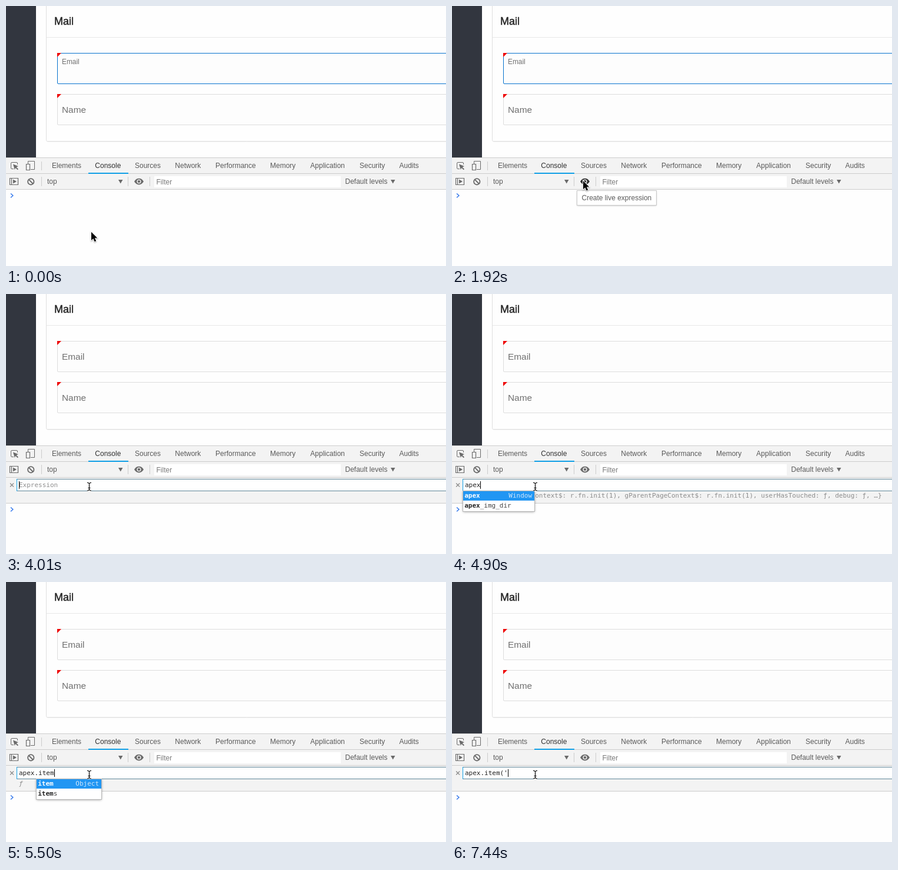
Animation, 748 px wide and 443 px high, one loop 8 s. Source, as an HTML page with a canvas:

```html
<!DOCTYPE html>
<html lang="en">
<head>
<meta charset="utf-8">
<title>Live expression demo</title>
<style>
  html, body { margin: 0; width: 100%; height: 100%; overflow: hidden; background: #fefefe; }
  canvas { display: block; }
</style>
</head>
<body>
<canvas id="stage" width="748" height="443"></canvas>
<script>
const ctx = document.getElementById('stage').getContext('2d');
const LOOP = 8000;
const SANS = '"Liberation Sans", Arial, sans-serif';
const MONO = '"DejaVu Sans Mono", Menlo, monospace';
const CHAR = 6.62;
const INK = '#5a5a5a', LINE = '#cccccc', BAR = '#f3f3f3', PAGE = '#fefefe';

// Step tracks: [time, ...values]
const POINTER = [
  [0, 145, 385], [140, 149, 381], [290, 166, 365], [440, 194, 339], [590, 222, 314],
  [740, 239, 302], [880, 243, 299], [1180, 233, 299], [1330, 231, 299], [1620, 227, 298],
  [1770, 223, 298], [3410, 201, 306], [3560, 158, 322], [3710, 141, 328]
];
const MAIL_CARET = [[0, 0], [290, 1], [740, 0], [1330, 1], [1770, 0], [2210, 1], [2810, 0]];
const CARET = [[0, 1], [3560, 0], [4010, 1], [6550, 0], [6990, 1]];
const TIP = [[0, 0], [1770, 0.4], [1920, 1], [2960, 0.4], [3110, 0]];
const FOCUS = [[0, 1], [2810, 0.9], [2960, 0.5], [3110, 0]];
const TYPED = [
  [0, ''], [4460, 'a'], [4610, 'ap'], [4750, 'ape'], [4900, 'apex'], [5050, 'apex.'],
  [5200, 'apex.i'], [5350, 'apex.ite'], [5500, 'apex.item'], [5950, 'apex.item('], [7440, "apex.item('"]
];
const GLOBALS = ['apex', 'apex_img_dir', 'addEventListener', 'alert', 'applicationCache', 'atob', 'alertinner'];
const MEMBERS = ['actions', 'ajax', 'confirm', 'da', 'debug', 'event', 'item', 'items'];
const PREVIEW = '{jQuery: ƒ, gPageContext$: r.fn.init(1), gParentPageContext$: r.fn.init(1), userHasTouched: ƒ, debug: ƒ, …}';

const at = (track, t) => track.filter(k => k[0] <= t).pop().slice(1);
const mix = (a, b, k) => a + (b - a) * k;
const blend = (a, b, k) => `rgb(${a.map((v, i) => Math.round(mix(v, b[i], k)))})`;

function box(x, y, w, h, fill) {
  ctx.fillStyle = fill;
  ctx.fillRect(x, y, w, h);
}

function frame(x, y, w, h, color) {
  ctx.strokeStyle = color;
  ctx.lineWidth = 1;
  ctx.strokeRect(x + 0.5, y + 0.5, w - 1, h - 1);
}

function poly(points, fill) {
  ctx.beginPath();
  for (let i = 0; i < points.length; i += 2) ctx.lineTo(points[i], points[i + 1]);
  ctx.closePath();
  ctx.fillStyle = fill;
  ctx.fill();
}

function stroke(d, color, width = 1) {
  ctx.strokeStyle = color;
  ctx.lineWidth = width;
  ctx.stroke(new Path2D(d));
}

function text(s, x, y, size = 12, color = INK, family = SANS, style = '') {
  ctx.font = `${style} ${size}px ${family}`;
  ctx.fillStyle = color;
  ctx.fillText(s, x, y);
}

const mono = (s, x, y, color, style) => text(s, x, y, 11, color, MONO, style);

function field(y, color) {
  box(87, y, 680, 53, '#fdfdfd');
  ctx.beginPath();
  ctx.roundRect(87.5, y + 0.5, 680, 52, 1.5);
  ctx.strokeStyle = color;
  ctx.lineWidth = 1;
  ctx.stroke();
  poly([87, y, 94, y, 87, y + 7], '#ee0000');
}

function drawForm(t) {
  const [focus] = at(FOCUS, t);
  box(0, 0, 51, 258, '#32363f');
  ctx.beginPath();
  ctx.roundRect(68.5, -10, 720, 240.5, 2);
  ctx.strokeStyle = '#dfdfdf';
  ctx.lineWidth = 1;
  ctx.stroke();
  box(70, 231, 678, 1, '#f3f3f3');
  box(69, 53, 679, 1, '#e8e8e8');

  text('Mail', 82, 32, 18, '#262626');
  ctx.strokeStyle = '#262626';
  ctx.lineWidth = 0.5;
  ctx.strokeText('Mail', 82, 32);

  const glow = focus === 0.5 ? 0.25 : focus;
  field(80, blend([221, 221, 221], [5, 114, 206], glow));
  field(150, '#dddddd');
  text('Email', 95, mix(112, 99, focus), mix(15.4, 11.9, focus), '#707070');
  text('Name', 95, 182, 15.4, '#707070');
  if (at(MAIL_CARET, t)[0]) box(97, 106, 1, 18, '#222222');
}

function drawIcons(hover) {
  const c = '#6a6a6a';
  // Element picker
  stroke('M13 277.5H10Q8.5 277.5 8.5 276V268Q8.5 266.5 10 266.5H18Q19.5 266.5 19.5 268V270', c);
  poly([12, 269.5, 21, 273, 17.7, 274.5, 21, 278, 19.5, 279.3, 16.2, 275.8, 14.8, 279], c);
  // Device mode
  stroke('M37.5 269V264.5H48.5V278.5H42', c);
  stroke('M34.5 269.5H40.5V279.5H34.5Z', c, 1.2);
  // Sidebar toggle
  stroke('M6.5 293.5H20.5V304.5H6.5ZM9.5 293.5V304.5', c, 1.2);
  poly([12, 295.5, 18, 299, 12, 302.5], c);
  // Clear
  ctx.beginPath();
  ctx.arc(42.3, 299.3, 5.2, 0, 7);
  ctx.strokeStyle = c;
  ctx.lineWidth = 1.8;
  ctx.stroke();
  stroke('M38.7 295.7L46 303', c, 1.8);
  // Eye
  const eye = hover ? '#303030' : '#6a6a6a';
  ctx.fillStyle = eye;
  ctx.fill(new Path2D('M218 299Q221 293.7 226 293.7T234 299Q231 304.4 226 304.4T218 299Z'));
  for (const [r, fill] of [[3.6, BAR], [2.2, eye]]) {
    ctx.beginPath();
    ctx.arc(226, 299, r, 0, 7);
    ctx.fillStyle = fill;
    ctx.fill();
  }
}

function drawTools(t) {
  box(0, 258, 748, 55, BAR);
  for (const y of [258, 285, 312]) box(0, y, 748, 1, LINE);
  box(140, 284, 68, 2, '#109fe6');
  const tabs = [['Elements', 78], ['Console', 151.3], ['Sources', 219], ['Network', 287.3],
    ['Performance', 356], ['Memory', 449], ['Application', 517.3], ['Security', 601], ['Audits', 668.5]];
  for (const [name, x] of tabs) text(name, x, 276, 12, name === 'Console' ? '#303030' : INK);
  box(60, 265, 1, 15, LINE);
  for (const x of [60, 207, 244]) box(x, 291, 1, 16, LINE);
  text('top', 70, 303);
  text('Default levels', 576.5, 303);
  for (const x of [191, 654]) poly([x, 296, x + 7.5, 296, x + 3.75, 302.5], '#6a6a6a');
  box(252, 290, 317, 19, '#ffffff');
  text('Filter', 255.5, 304, 12, '#7a7a7a');
  drawIcons(t >= 1180 && t < 2960);
}

function popup(x, names, match, label, width) {
  const h = names.length * 17;
  ctx.save();
  ctx.shadowColor = 'rgba(0,0,0,.45)';
  ctx.shadowBlur = 4;
  ctx.shadowOffsetY = 1;
  box(x, 336, width, h, '#ffffff');
  ctx.restore();
  frame(x - 1, 335, width + 2, h + 2, '#b8b8b8');
  box(x, 336, width, 16, '#2196f3');
  names.forEach((name, i) => {
    const y = 347 + i * 17, color = i ? '#222222' : '#ffffff';
    mono(name.slice(0, match), x + 2.2, y, color, 'bold');
    mono(name.slice(match), x + 2.2 + match * CHAR, y, i ? '#444444' : '#ffffff');
  });
  mono(label, x + width - 4 - label.length * CHAR, 347, '#cfe6fb');
}

function drawSuggestions(typed) {
  if (!typed || typed.includes('(')) return;
  const [root, member] = typed.split('.');
  const prefix = member ?? root;
  const names = (member === undefined ? GLOBALS : MEMBERS).filter(n => n.startsWith(prefix));
  const longest = Math.max(...names.map(n => n.length));
  const width = Math.max(110, Math.round((longest + 6) * CHAR + 1.5));
  if (member === undefined) popup(19, names, prefix.length, 'Window', width);
  else popup(52, names, prefix.length, 'Object', width);
}

function drawConsole(t) {
  const open = t >= 3110;
  const y = open ? 367 : 323;
  stroke(`M8 ${y - 3.5}L11.8 ${y}L8 ${y + 3.5}`, '#3b7ded', 1.6);
  if (!open) return;

  const [typed] = at(TYPED, t);
  box(0, 313, 748, 43, BAR);
  box(0, 356, 748, 1, LINE);
  stroke('M7 322.5L13 328.5M13 322.5L7 328.5', '#8a8a8a', 1.3);
  box(18, 315, 730, 21, '#ffffff');
  box(18, 315, 730, 1, '#5f8699');
  box(18, 335, 730, 1, '#5f8699');
  box(18, 315, 1, 21, '#109fe6');

  if (typed) mono(typed, 22, 329, '#222222');
  else mono('Expression', 22, 329, '#8e8e8e');
  if (typed === 'apex') mono(PREVIEW, 22, 347, '#8c8c8c');
  if (typed === 'apex.item' || (t >= 5950 && t < 6100)) mono('ƒ', 22, 347, '#8c8c8c', 'italic');
  drawSuggestions(typed);
  if (at(CARET, t)[0]) box(Math.round(22 + typed.length * CHAR), 319, 1, 13, '#000000');
}

function drawTip(alpha) {
  if (!alpha) return;
  ctx.save();
  ctx.globalAlpha = alpha;
  ctx.shadowColor = 'rgba(0,0,0,.3)';
  ctx.shadowBlur = 3;
  ctx.shadowOffsetY = 1;
  box(213, 315, 134, 24, '#ffffff');
  ctx.shadowColor = 'transparent';
  frame(212, 314, 136, 26, '#c8c8c8');
  text('Create live expression', 220.5, 331);
  ctx.restore();
}

function drawPointer(t) {
  const [x, y] = at(POINTER, t);
  ctx.save();
  ctx.translate(x, y);
  if (t >= 3560) {
    const beam = 'M-3 -6.5H-1.5L.5 -5L2.5 -6.5H4M.5 -5V5.5M-3 7H-1.5L.5 5.5L2.5 7H4M-1.5 2.5H2.5';
    stroke(beam, '#ffffff', 2.6);
    stroke(beam, '#000000', 1.2);
  } else {
    const arrow = new Path2D('M0 0V14.2L3.3 11.2L5.6 16.6L8.2 15.5L5.9 10.2H10.2Z');
    ctx.shadowColor = 'rgba(0,0,0,.35)';
    ctx.shadowBlur = 2;
    ctx.shadowOffsetY = 1;
    ctx.lineWidth = 1.8;
    ctx.strokeStyle = '#ffffff';
    ctx.stroke(arrow);
    ctx.shadowColor = 'transparent';
    ctx.fillStyle = '#000000';
    ctx.fill(arrow);
  }
  ctx.restore();
}

function draw(now) {
  const t = now % LOOP;
  box(0, 0, 748, 443, PAGE);
  drawForm(t);
  drawTools(t);
  drawConsole(t);
  drawTip(at(TIP, t)[0]);
  drawPointer(t);
}

let start;
function tick(now) {
  start ??= now;
  draw(Math.max(0, now - start));
  requestAnimationFrame(tick);
}
draw(0);
requestAnimationFrame(tick);
</script>
</body>
</html>
```
